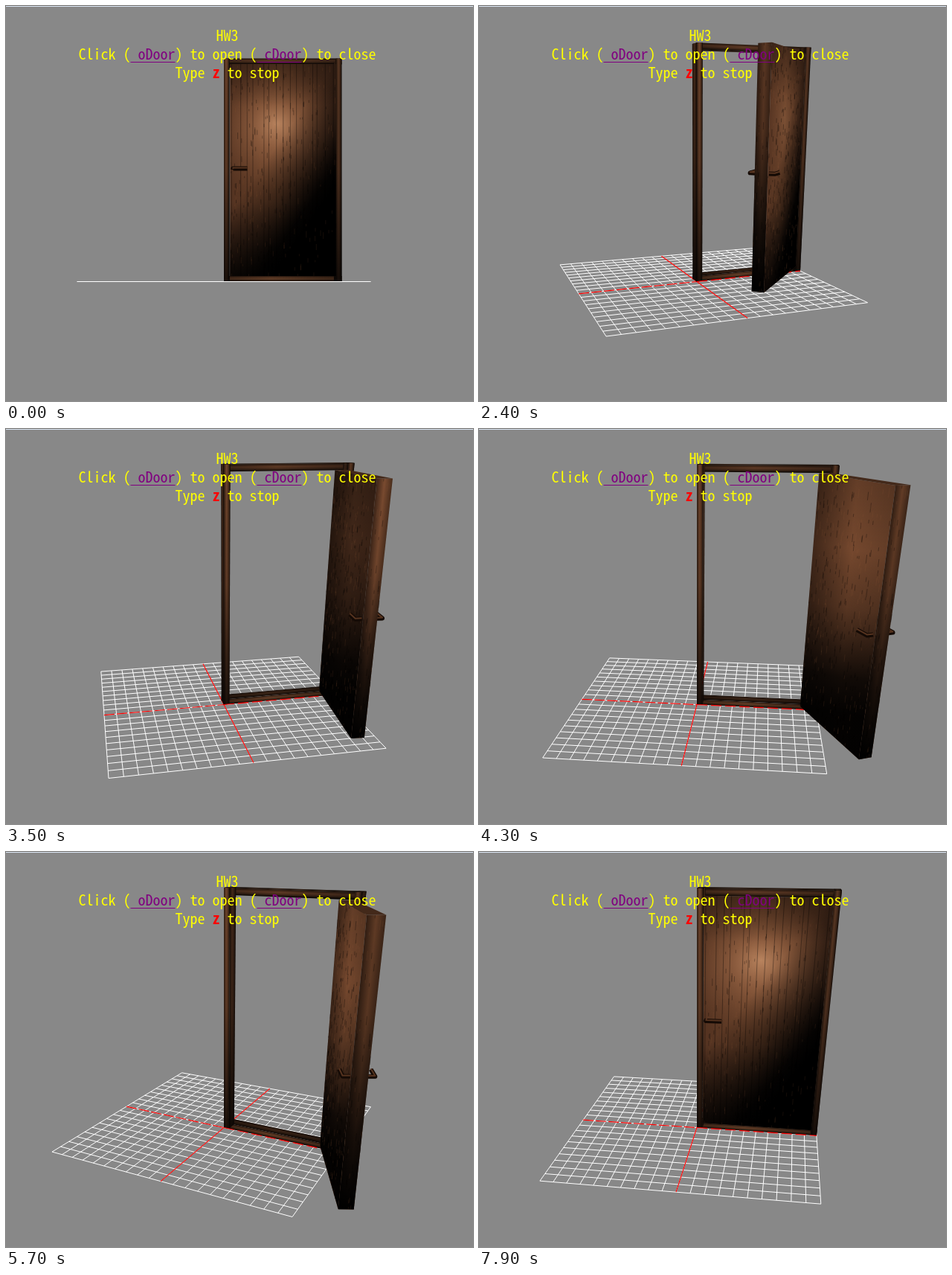
Recreate the animation shown at these times as an HTML page with a canvas. Size 628 by 531 pixels, loop 8 s.

```html
<!DOCTYPE html>
<html lang="en">
<head>
<meta charset="utf-8">
<title>HW3</title>
<style>
html, body { margin: 0; width: 100%; height: 100%; overflow: hidden; background: #888; }
canvas { position: absolute; left: 0; top: 0; }
.bar { position: absolute; left: 0; top: 0; width: 628px; height: 1px; background: #d8e3f0; }
.text {
  position: absolute; left: 0; top: 26px; width: 595px; margin: 0;
  font: 20px/25px "Noto Sans Mono CJK TC", "Noto Sans Mono CJK JP", "Noto Sans CJK TC", "Noto Sans CJK JP", monospace;
  font-feature-settings: "hwid";
  color: #ff0; text-align: center; white-space: pre;
}
.text u { color: #800080; text-underline-offset: 3px; text-decoration-thickness: 1px; }
.text b { color: #f00; }
</style>
</head>
<body>
<canvas id="stage" width="628" height="531"></canvas>
<div class="bar"></div>
<div class="text">HW3
Click (<u> oDoor</u>) to open (<u> cDoor</u>) to close
Type <b>z</b> to stop</div>
<script>
const ctx = document.getElementById('stage').getContext('2d');
const LOOP = 8000, STEP = 100, RAD = Math.PI / 180;
const SCALE = 158.5, DIST = 5.08, CX = 293, CY = 370.5;
const RAIL = 0.048, HEIGHT = 1.893, DEPTH = 0.1, DOOR = 0.9;

// time, yaw, pitch
const viewKeys = [
  [300, 0, 0], [500, -2.7, -1.5], [2000, -2.7, -1.5], [2400, 20.7, 15.8],
  [2900, 47, 15.6], [3100, 55, 16.5], [3300, 34, 21.5], [3500, 12, 24.5],
  [4300, -6.2, 25.4], [4700, -26.8, 25.4], [6200, -26.8, 25.4], [6600, -8.4, 27.2]
];
// time, door angle
const doorKeys = [
  [1150, 0], [2400, 44.7], [4300, 114], [5000, 136.5], [5600, 136.5],
  [5700, 116], [6000, 6.5], [7700, 6.5], [7900, 0]
];

function sample(keys, t) {
  if (t <= keys[0][0]) return keys[0].slice(1);
  const i = keys.findIndex(k => k[0] >= t);
  if (i < 0) return keys[keys.length - 1].slice(1);
  const a = keys[i - 1], b = keys[i], f = (t - a[0]) / (b[0] - a[0]);
  return a.slice(1).map((v, j) => v + (b[j + 1] - v) * f);
}

const clamp = (v, lo = 0, hi = 1) => Math.min(hi, Math.max(lo, v));
let seed = 11;
const rnd = () => (seed = (seed * 16807) % 2147483647) / 2147483647;

const planks = Array.from({ length: 15 }, (_, i) => (i + 0.2 + rnd() * 0.7) / 15);
const grain = Array.from({ length: 420 }, () => ({
  u: rnd(), v: rnd(), len: 0.008 + rnd() * 0.025, dark: rnd() < 0.6
}));

let sy, cy, sp, cp;
function setView(yaw, pitch) {
  sy = Math.sin(yaw * RAD); cy = Math.cos(yaw * RAD);
  sp = Math.sin(pitch * RAD); cp = Math.cos(pitch * RAD);
}

function project([x, y, z]) {
  const h = x * cy + z * sy, d = z * cy - x * sy;
  const k = SCALE / (1 - (d * cp + y * sp) / DIST);
  return [CX + h * k, CY - (y * cp - d * sp) * k];
}

function line(a, b) {
  const p = project(a), q = project(b);
  ctx.moveTo(p[0], p[1]);
  ctx.lineTo(q[0], q[1]);
}

function trace(pts) {
  ctx.beginPath();
  pts.forEach(p => ctx.lineTo(p[0], p[1]));
  ctx.closePath();
}

const area = p => p.reduce((s, a, i) => {
  const b = p[(i + 1) % p.length];
  return s + a[0] * b[1] - b[0] * a[1];
}, 0);

function gradient(x0, y0, x1, y1, stops) {
  const g = ctx.createLinearGradient(x0, y0, x1, y1);
  stops.forEach(([at, color]) => g.addColorStop(at, color));
  return g;
}

const wood = l => `rgb(${112 * l | 0},${69 * l | 0},${44 * l | 0})`;
const black = a => `rgba(0,0,0,${a})`;

function flood(style) {
  ctx.fillStyle = style;
  ctx.fillRect(-1, -1, 4, 5);
}

// Runs paint() in unit face coordinates, clipped to the face outline.
function onFace(pts, paint) {
  const [a, b, , d] = pts;
  ctx.save();
  trace(pts);
  ctx.clip();
  ctx.transform(b[0] - a[0], b[1] - a[1], d[0] - a[0], d[1] - a[1], a[0], a[1]);
  paint();
  ctx.restore();
}

function boxFaces(x0, x1, y0, y1, z0, z1) {
  return {
    back: [[x1, y1, z0], [x0, y1, z0], [x0, y0, z0], [x1, y0, z0]],
    left: [[x0, y1, z0], [x0, y1, z1], [x0, y0, z1], [x0, y0, z0]],
    right: [[x1, y1, z1], [x1, y1, z0], [x1, y0, z0], [x1, y0, z1]],
    top: [[x0, y1, z0], [x1, y1, z0], [x1, y1, z1], [x0, y1, z1]],
    bottom: [[x0, y0, z1], [x1, y0, z1], [x1, y0, z0], [x0, y0, z0]],
    front: [[x0, y1, z1], [x1, y1, z1], [x1, y0, z1], [x0, y0, z1]]
  };
}

function drawBeam(bounds, upright, light) {
  const faces = boxFaces(...bounds);
  for (const name in faces) {
    const pts = faces[name].map(project);
    if (area(pts) <= 0) continue;
    const l = light * (name === 'front' ? 1 : 0.6);
    onFace(pts, () => {
      const stops = [[0, wood(l * 0.4)], [0.4, wood(l)], [0.7, wood(l * 0.7)], [1, wood(0.1)]];
      flood(upright ? gradient(0, 0, 1, 0, stops) : gradient(0, 0, 0, 1, stops));
      if (upright) flood(gradient(0, 0, 0, 1, [[0, black(0)], [0.5, black(0.15)], [1, black(0.75)]]));
      else flood(gradient(0, 0, 1, 0, [[0, black(0.35)], [0.4, black(0)], [1, black(0.4)]]));
    });
  }
}

function drawFrame() {
  const top = HEIGHT - RAIL;
  drawBeam([0, 1, 0, RAIL, -DEPTH, 0], false, 0.9);
  drawBeam([0, 1, top, HEIGHT, -DEPTH, 0], false, 0.85);
  const posts = [
    () => drawBeam([0, RAIL, 0, HEIGHT, -DEPTH, 0], true, 1),
    () => drawBeam([1 - RAIL, 1, 0, HEIGHT, -DEPTH, 0], true, 0.8)
  ];
  if (sy > 0) posts.reverse();
  posts.forEach(p => p());
}

function drawGrain(corners, toWorld, count, withPlanks) {
  const [a, b, , d] = corners;
  const at = (u, v) => toWorld(a.map((c, i) => c + (b[i] - c) * u + (d[i] - c) * v));
  ctx.lineWidth = 1;
  if (withPlanks) {
    ctx.strokeStyle = black(0.35);
    ctx.beginPath();
    planks.forEach(u => line(at(u, 0), at(u, 1)));
    ctx.stroke();
  }
  for (const dark of [true, false]) {
    ctx.strokeStyle = dark ? black(0.3) : 'rgba(150,95,60,.14)';
    ctx.beginPath();
    grain.slice(0, count).forEach(g => {
      if (g.dark === dark) line(at(g.u, g.v), at(g.u, Math.min(1, g.v + g.len)));
    });
    ctx.stroke();
  }
}

function paintOuter(angle) {
  const glow = clamp(1 - angle / 60);
  flood(gradient(0, 0, 1, 0, [[0, wood(0.75)], [0.45, wood(0.9)], [1, wood(0.55)]]));
  ctx.save();
  ctx.scale(1, 0.5);
  const g = ctx.createRadialGradient(0.44, 0.56, 0, 0.44, 0.64, 0.65);
  g.addColorStop(0, `rgba(200,144,104,${0.85 * glow})`);
  g.addColorStop(0.35, `rgba(162,108,74,${0.6 * glow})`);
  g.addColorStop(1, 'rgba(112,69,44,0)');
  flood(g);
  ctx.restore();
  // diagonal falloff, measured in true door proportions
  ctx.save();
  ctx.scale(1 / DOOR, 1 / 1.8);
  ctx.fillStyle = gradient(0.82 * 0.72, 0.58 * 0.72, 0.82 * 1.32, 0.58 * 1.32,
    [[0, black(0)], [0.5, black(0.5)], [0.85, black(0.94)], [1, black(1)]]);
  ctx.fillRect(-1, -1, 4, 5);
  ctx.restore();
  flood(gradient(0, 0, 0, 1, [[0, black(0.3)], [0.2, black(0)], [0.65, black(0)], [1, black(0.75)]]));
}

function paintInner(angle) {
  const l = 0.45 + 0.6 * clamp((angle - 78) / 32);
  flood(gradient(0, 0, 1, 0, [[0, wood(l * 0.55)], [0.5, wood(l)], [1, wood(l * 0.85)]]));
  flood(gradient(0, 0, 0, 1, [[0, black(0.15)], [0.3, black(0)], [0.55, black(0.25)], [0.85, black(0.85)], [1, black(0.97)]]));
}

function paintEdge(angle) {
  const l = 0.8 + 0.3 * clamp(1 - Math.abs(angle - 84) / 40);
  flood(gradient(0, 0, 1, 0, [[0, wood(l * 0.5)], [0.5, wood(l)], [1, wood(l * 0.6)]]));
  flood(gradient(0, 0, 0, 1, [[0, black(0)], [0.35, black(0.1)], [0.75, black(0.75)], [1, black(1)]]));
}

function drawHandle(toWorld, side) {
  const base = side > 0 ? 0 : -DEPTH, out = base + side * 0.045, y = 0.95;
  const pts = [[-0.875, y, base], [-0.875, y, out], [-0.755, y, out]].map(p => project(toWorld(p)));
  const stroke = (color, width, dy) => {
    ctx.strokeStyle = color;
    ctx.lineWidth = width;
    ctx.beginPath();
    pts.forEach(p => ctx.lineTo(p[0], p[1] + dy));
    ctx.stroke();
  };
  ctx.lineJoin = 'round';
  stroke('#140a05', 6, 0);
  stroke('#55331f', 2, -1);
}

function drawDoor(angle) {
  const s = Math.sin(angle * RAD), c = Math.cos(angle * RAD);
  const toWorld = ([x, y, z]) => [1 - RAIL + x * c + z * s, y, z * c - x * s];
  const faces = boxFaces(-DOOR, 0, RAIL, HEIGHT - RAIL, -DEPTH, 0);
  const flat = {};
  for (const name in faces) flat[name] = faces[name].map(p => project(toWorld(p)));
  const outer = area(flat.front) > 0;

  if (angle > 10) drawHandle(toWorld, outer ? -1 : 1);
  for (const name in faces) {
    const pts = flat[name];
    if (area(pts) <= 0) continue;
    if (angle < 10 && name !== 'front' && !(name === 'left' && angle > 2)) continue;
    onFace(pts, () => {
      if (name === 'front') paintOuter(angle);
      else if (name === 'back') paintInner(angle);
      else if (name === 'top') flood(wood(0.6));
      else if (name === 'bottom') flood('#000');
      else paintEdge(angle);
    });
    if (name === 'front') drawGrain(faces[name], toWorld, grain.length, angle < 10);
    else if (name === 'back') drawGrain(faces[name], toWorld, grain.length, false);
    else if (name === 'left') drawGrain(faces[name], toWorld, 60, false);
  }
  drawHandle(toWorld, outer ? 1 : -1);
}

function drawAxis(a, b, dash) {
  ctx.strokeStyle = '#f00';
  ctx.lineWidth = 1.2;
  ctx.setLineDash(dash);
  ctx.beginPath();
  line(a, b);
  ctx.stroke();
  ctx.setLineDash([]);
}

function drawGrid() {
  ctx.strokeStyle = '#fff';
  ctx.lineWidth = 1;
  ctx.beginPath();
  for (let i = -10; i <= 10; i++) {
    const v = i / 10;
    line([v, 0, -1], [v, 0, 1]);
    line([-1, 0, v], [1, 0, v]);
  }
  ctx.stroke();
}

function draw(time) {
  const t = Math.floor((time % LOOP) / STEP) * STEP;
  const [yaw, pitch] = sample(viewKeys, t);
  const [angle] = sample(doorKeys, t);
  setView(yaw, pitch);
  ctx.fillStyle = '#888';
  ctx.fillRect(0, 0, 628, 531);

  if (pitch > 0) {
    drawGrid();
    drawAxis([0, 0, -1], [0, 0, 1], []);
    drawAxis([-1, 0, 0], [0, 0, 0], [14, 3]);
    drawFrame();
    drawAxis([0, 0, 0], [1, 0, 0], [14, 5]);
    drawDoor(angle);
  } else {
    drawFrame();
    drawDoor(angle);
    drawGrid();
    if (pitch < 0) drawAxis([0.19, 0, 0], [1, 0, 0], [48, 2, 14, 2]);
  }
}

const start = performance.now();
function tick() {
  draw(performance.now() - start);
  requestAnimationFrame(tick);
}
tick();
</script>
</body>
</html>
```
